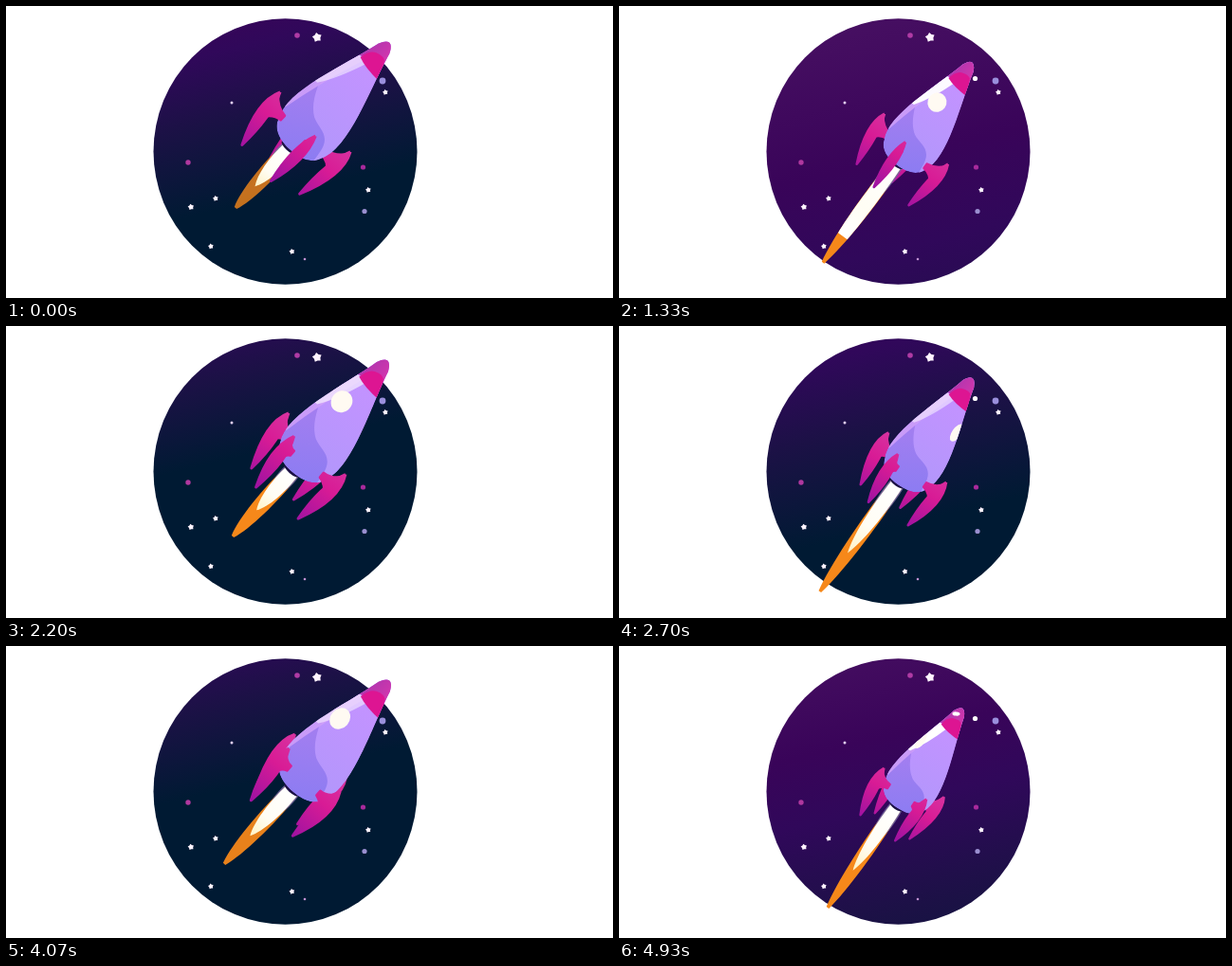
These frames come from a looping animation (640x308 px, 5000 ms). An HTML page with a canvas:

```html
<!DOCTYPE html>
<html lang="en">
<head>
<meta charset="utf-8">
<title>Rocket</title>
<style>
html, body { margin: 0; width: 100%; height: 100%; overflow: hidden; background: #fff; }
canvas { display: block; width: 640px; height: 308px; }
</style>
</head>
<body>
<canvas id="stage" width="640" height="308"></canvas>
<script>
const ctx = document.getElementById('stage').getContext('2d');
const LOOP = 5000, CYCLE = 58000 / 30, STEP = 1000 / 30, TAU = Math.PI * 2;

// time, tail x y, nose x y, flame end x y, core length, core bluntness,
// flame opacity, shine, sky top, sky bottom
const POSES = [
  [0,    303, 147, 404, 39, 242, 213, .64, 0, .8,  .5,  -96, 190],
  [204,  306, 149, 404, 37, 230, 230, .62, 0, .95, .5,  -145, 127],
  [267,  306, 150, 402, 37, 239, 222, .6,  0, 1,   .6,  -145, 119],
  [600,  299, 160, 381, 48, 211, 275, .65, 0, 1,   .3,  -167, 110],
  [1064, 296, 167, 362, 66, 220, 276, .63, 0, 1,   1,   -42, 420],
  [1330, 296, 164, 372, 60, 215, 271, .73, 6, 1,   .95, -18, 597]
];

// time, angle of the porthole around the hull in degrees
const PORTHOLE = [[97, -65], [204, -30], [267, -21], [363, -14], [600, 14], [850, 85]];

const DOTS = [
  [307, 31, 2.8, '#b03ba5'], [397, 79, 3.4, '#9a8fdc'], [375.5, 76.5, 2.6, '#fff'],
  [376.5, 170, 2.6, '#a82a9c'], [192, 165, 2.7, '#b0389f'], [378, 216.5, 2.6, '#9a8fd0'],
  [238, 102, 1.5, '#e4d0f4'], [315, 267, 1.3, '#c090d0']
];
const STARS = [[328, 33, 5.2], [400, 91, 3], [195, 212, 3.4], [221, 203, 3],
  [382, 194, 3], [301.5, 259, 3], [216, 253.5, 3]];

const BODY = new Path2D('M-31-10C-46-38-18-100-8-141Q0-158 8-141C18-100 46-38 31-10C27 2 14 6 0 6C-14 6-27 2-31-10Z');
const SWIRL = new Path2D('M-24-64C-18-50-12-42-4-37C8-31 24-36 26-10L28 8L60 8L60-160L-24-160Z');
const RIM = new Path2D('M-34-24Q-24-70-7-118L-30-118L-50-24Z');
const SHINE = new Path2D('M-27-66Q-14-84-2-118L-30-118L-44-66Z');
const NOSE = new Path2D('M-24-115Q0-126 24-112L24-160L-24-160Z');
const NOSE_SHADE = new Path2D('M-12-117Q-10-129-3-132Q5-135 9-132L20-112Q0-112-12-117Z');

const clamp = v => Math.max(0, Math.min(1, v));

function fill(path, color, alpha = 1) {
  ctx.globalAlpha = alpha;
  ctx.fillStyle = color;
  ctx.fill(path);
  ctx.globalAlpha = 1;
}

function ramp(x1, y1, x2, y2, ...stops) {
  const g = ctx.createLinearGradient(x1, y1, x2, y2);
  for (const [at, color] of stops) g.addColorStop(at, color);
  return g;
}

// smooth curve through the rows, closed over one cycle
function poseAt(time) {
  const n = POSES.length;
  const row = i => POSES[(i + n) % n];
  const when = i => row(i)[0] + Math.floor(i / n) * CYCLE;
  let i = n - 1;
  while (POSES[i][0] > time) i--;
  const span = when(i + 1) - when(i), u = (time - when(i)) / span;
  const slope = (k, c) => (row(k + 1)[c] - row(k - 1)[c]) / (when(k + 1) - when(k - 1)) * span;
  return row(i).map((a, c) => {
    const b = row(i + 1)[c];
    return a + u * u * (3 - 2 * u) * (b - a)
      + u * (1 - u) * (1 - u) * slope(i, c) - u * u * (1 - u) * slope(i + 1, c);
  });
}

function dot(x, y, r, color) {
  ctx.fillStyle = color;
  ctx.beginPath();
  ctx.arc(x, y, r, 0, TAU);
  ctx.fill();
}

function star(x, y, r) {
  ctx.fillStyle = '#fff4ff';
  ctx.beginPath();
  for (let k = 0; k < 10; k++) {
    const a = k * TAU / 10 - 1.75, d = k % 2 ? r * .66 : r;
    ctx.lineTo(x + d * Math.cos(a), y + d * Math.sin(a));
  }
  ctx.fill();
}

function sky(y1, y2) {
  const lean = (y2 - y1) * .12;
  ctx.fillStyle = ramp(294 - lean, y1, 294 + lean, y2, [0, '#4a1264'], [.3, '#390459'],
    [.45, '#30085a'], [.68, '#1c1146'], [1, '#001a33']);
  ctx.beginPath();
  ctx.ellipse(294.5, 153.5, 139, 140.3, 0, 0, TAU);
  ctx.fill();
  DOTS.forEach(d => dot(...d));
  STARS.forEach(s => star(...s));
}

function flame(x, y, endX, endY, core, blunt, alpha, size) {
  const len = Math.hypot(endX - x, endY - y), w = 8.5 * size, c = len * core;
  ctx.save();
  ctx.translate(x, y);
  ctx.rotate(Math.atan2(endY - y, endX - x) - Math.PI / 2);
  const shape = (half, end, tip) => new Path2D(
    `M${-half}-10L${-half} 0C${-half - 2} ${end * .4} ${-half * .9 - tip * .3} ${end * .8} ${-tip} ${end}` +
    `L${tip} ${end}C${half * .9 + tip * .3} ${end * .8} ${half + 2} ${end * .4} ${half} 0L${half}-10Z`);
  fill(shape(w, len, 1.6), '#f6881a', alpha);
  fill(shape(w + .6, c * .55, 2), '#6d68a8', .8);
  fill(shape(w - .8, c, blunt), ramp(0, 0, 0, c, [0, '#fff'], [.6, '#fffdf4'], [1, blunt > 3 ? '#fff' : '#fff2c4']));
  ctx.restore();
}

function fin(angle) {
  const s = Math.sin(angle), c = Math.cos(angle);
  const at = (r, z, dx = 0) => [r * s + dx, -z + 11 * c * r / 50];
  const wide = (s < 0 ? -1 : 1) * (2 + 7 * Math.abs(c));
  const top = at(50, 34), tip = at(41, -35);
  const outer = at(59, 10, wide), inner = at(42, 8, -wide);
  ctx.fillStyle = ctx.strokeStyle = ramp(0, -38, 0, 44, [0, '#d8319f'], [.4, '#d81b95'], [1, '#9c12a2']);
  ctx.lineWidth = 3;
  ctx.lineJoin = 'round';
  ctx.beginPath();
  ctx.moveTo(...top);
  ctx.quadraticCurveTo(...outer, ...tip);
  ctx.quadraticCurveTo(...inner, ...top);
  ctx.fill();
  ctx.stroke();
  // arm joining the blade to the hull
  ctx.beginPath();
  ctx.moveTo(...at(50, 31));
  ctx.quadraticCurveTo(...at(42, 20), ...at(29, 18));
  ctx.lineTo(...at(29, 12));
  ctx.quadraticCurveTo(...at(40, 12), ...at(47, 0));
  ctx.closePath();
  ctx.fill();
  ctx.stroke();
}

function porthole(time) {
  const t = time % CYCLE;
  const i = PORTHOLE.findIndex((p, k) => k && t <= p[0]) - 1;
  if (i < 0 || t < PORTHOLE[0][0]) return;
  const [t0, a0] = PORTHOLE[i], [t1, a1] = PORTHOLE[i + 1];
  const angle = (a0 + (a1 - a0) * (t - t0) / (t1 - t0)) * TAU / 360;
  ctx.fillStyle = '#fffaf2';
  ctx.beginPath();
  ctx.ellipse(25 * Math.sin(angle), -85, 11.8 * Math.cos(angle), 12, 0, 0, TAU);
  ctx.fill();
}

function hull(time, shine) {
  ctx.save();
  ctx.clip(BODY);
  fill(BODY, ramp(-20, -60, 20, 4, [0, '#a27ef0'], [1, '#8c7cf2']));
  fill(SWIRL, ramp(0, -110, 10, 0, [0, '#c293ff'], [1, '#b197fb']));
  fill(RIM, '#d0a0fa', .85);
  fill(SHINE, '#fff', clamp(shine));
  porthole(time);
  porthole(time + CYCLE / 2);
  fill(NOSE, ramp(-10, 0, 12, 0, [0, '#b636ae'], [1, '#d336ad']));
  fill(NOSE_SHADE, '#dd1592');
  ctx.globalAlpha = clamp((shine - .95) * 20);
  ctx.fillStyle = '#fff';
  ctx.beginPath();
  ctx.ellipse(-3, -139, 5, 2.6, -.5, 0, TAU);
  ctx.fill();
  ctx.restore();
}

function draw(now) {
  const time = Math.floor((now % LOOP) / STEP + .15) * STEP % CYCLE;
  const [, x, y, noseX, noseY, endX, endY, core, blunt, glow, shine, y1, y2] = poseAt(time);
  const size = Math.hypot(noseX - x, noseY - y) / 149;
  const turn = (12 / 360 + time / CYCLE) * TAU;
  const fins = [0, 1, 2, 3].map(k => turn + k * TAU / 4).sort((a, b) => Math.cos(a) - Math.cos(b));

  const inRocket = paint => {
    ctx.save();
    ctx.translate(x, y);
    ctx.rotate(Math.atan2(noseX - x, y - noseY));
    ctx.scale(size, size);
    paint();
    ctx.restore();
  };

  ctx.clearRect(0, 0, 640, 308);
  sky(y1, y2);
  inRocket(() => fins.filter(a => Math.cos(a) < 0).forEach(fin));
  flame(x - 4, y + 3, endX, endY, core, Math.max(0, blunt), clamp(glow), size);
  inRocket(() => {
    ctx.fillStyle = '#1c1146';
    ctx.beginPath();
    ctx.ellipse(-2, 5, 10, 3.5, 0, 0, TAU);
    ctx.fill();
    hull(time, shine);
    fins.filter(a => Math.cos(a) >= 0).forEach(fin);
  });
}

const start = performance.now();
function tick() {
  draw(performance.now() - start);
  requestAnimationFrame(tick);
}
tick();
</script>
</body>
</html>
```
